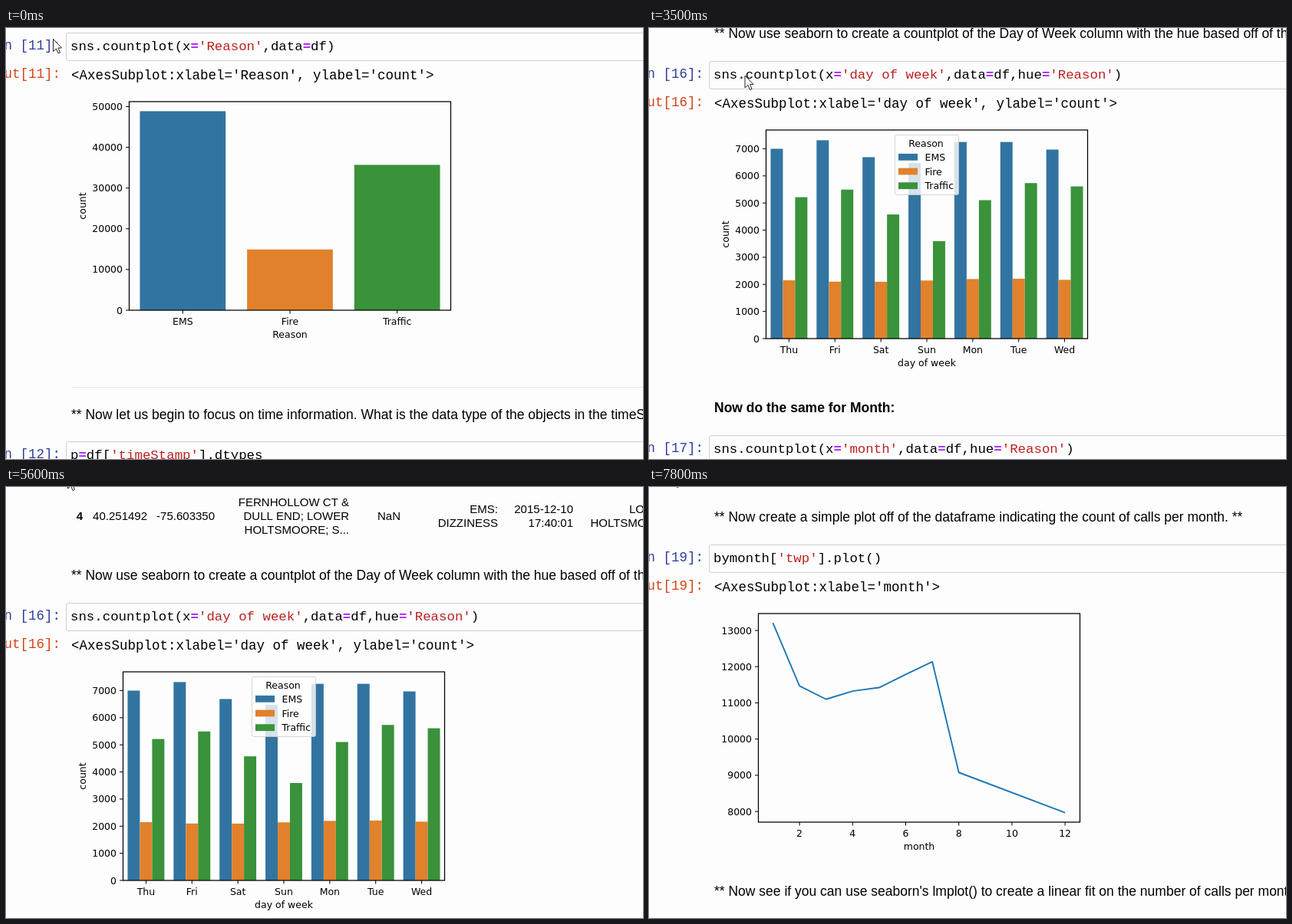
An HTML page with a canvas that plays this animation: 830x562 px, repeating every 8000 ms.

```html
<!DOCTYPE html>
<html lang="en">
<head>
<meta charset="utf-8">
<title>Notebook charts</title>
<style>
html, body { margin: 0; width: 100%; height: 100%; overflow: hidden; background: #fdfdfd; }
canvas { display: block; }
</style>
</head>
<body>
<canvas id="stage" width="830" height="562"></canvas>
<script>
const c = document.getElementById('stage').getContext('2d');
const SANS = '"Liberation Sans", Arial, sans-serif';
const MONO = '"Liberation Mono", "Courier New", monospace';
const LABEL = '12.5px "DejaVu Sans", sans-serif';
const HUES = ['#3274a1', '#e1812c', '#3a923a'];
const REASONS = ['EMS', 'Fire', 'Traffic'];
const DAYS = ['Thu', 'Fri', 'Sat', 'Sun', 'Mon', 'Tue', 'Wed'];
const MONTHS = [1, 2, 3, 4, 5, 6, 7, 8, 12];
const LOOP = 8000, CELL = 488; // CELL: distance from one code cell to the next
const AXES_W = 419, AXES_H = 272;

// calls per weekday: Fire is nearly flat, Traffic drops on Sunday
const dayEms = [7000, 7315, 6690, 6475, 7250, 7250, 6970];
const dayFire = DAYS.map((_, i) => 2150 - 60 * Math.sin(i));
const dayTraffic = dayEms.map((v, i) =>
  v * (.775 + .01 * (i - 3) - .22 * Math.exp(-((i - 3) ** 2))));

// calls per month, split into shares
const calls = [13205, 11467, 11101, 11326, 11423, 11786, 12137, 9078, 7969];
const emsShare = m => m < 3 ? .445 + .014 * m : .492 + .9 / m ** 3;
const monthEms = calls.map((v, i) => v * emsShare(MONTHS[i]));
const monthFire = calls.map(v => v * .152);
const monthTraffic = calls.map((v, i) => v - monthEms[i] - monthFire[i]);

function text(s, x, y, font, color = '#000', align = 'left') {
  c.font = font;
  c.fillStyle = color;
  c.textAlign = align;
  c.fillText(s, x, y);
}

function line(x1, y1, x2, y2, color = '#000') {
  c.strokeStyle = color;
  c.lineWidth = 1;
  c.beginPath();
  c.moveTo(x1, y1);
  c.lineTo(x2, y2);
  c.stroke();
}

function box(x, y, w, h, stroke, fill) {
  c.beginPath();
  c.roundRect(x, y, w, h, 2.5);
  c.fillStyle = fill;
  c.fill();
  c.strokeStyle = stroke;
  c.lineWidth = 1;
  c.stroke();
}

function heading(s, top, bold = '') {
  text(s, 85, top - 30, `${bold} 17.5px ${SANS}`);
}

function codeCell(n, code, top) {
  text(`In [${n}]:`, -13, top + 22, `17.5px ${MONO}`, '#303f9f');
  box(78.5, top + .5, 800, 36, '#cfcfcf', '#fdfdfd');
  let x = 84;
  for (const part of code.split(/('[^']*'|=)/)) {
    const op = part === '=';
    text(part, x, top + 23, `${op ? 'bold' : ''} 17.4px ${MONO}`,
      op ? '#aa22ff' : part[0] === "'" ? '#ba2121' : '#000');
    x += c.measureText(part).width;
  }
}

function output(n, s, top) {
  text(`Out[${n}]:`, -13, top + 59, `17.5px ${MONO}`, '#d84315');
  text(s, 85, top + 61, `17.5px ${MONO}`);
}

function yTick(left, y, label) {
  line(left - 4.5, y, left, y);
  text(label, left - 8.5, y + 4.5, LABEL, '#000', 'right');
}

function xTick(x, bottom, label) {
  line(x, bottom, x, bottom + 4.5);
  text(label, x, bottom + 19, LABEL, '#000', 'center');
}

function frame(left, bottom, xlabel) {
  c.strokeStyle = '#000';
  c.lineWidth = 1.25;
  c.strokeRect(left, bottom - AXES_H, AXES_W, AXES_H);
  text(xlabel, left + AXES_W / 2, bottom + 36, LABEL, '#000', 'center');
}

// series: one list of counts per hue; a single list colours each bar by category
function barChart({ left, top, names, series, step, scale, xlabel }) {
  const bottom = top + 362, slot = AXES_W / names.length;
  const w = slot * .8 / series.length;
  names.forEach((name, i) => {
    const mid = left + slot * (i + .5);
    series.forEach((counts, k) => {
      const h = counts[i] * scale;
      c.fillStyle = HUES[series.length > 1 ? k : i];
      c.fillRect(mid - slot * .4 + k * w, bottom - h, w, h);
    });
    xTick(mid, bottom, name);
  });
  for (let v = 0; v * scale < AXES_H; v += step) yTick(left, bottom - v * scale, v);
  frame(left, bottom, xlabel);
  c.save();
  c.translate(104, bottom - AXES_H / 2);
  c.rotate(-Math.PI / 2);
  text('count', 0, 0, LABEL, '#000', 'center');
  c.restore();
}

function legend(x, y) {
  box(x + .5, y + .5, 83, 78, 'rgba(204,204,204,.8)', 'rgba(255,255,255,.8)');
  text('Reason', x + 41, y + 16, LABEL, '#000', 'center');
  REASONS.forEach((name, i) => {
    const mid = y + 29.3 + i * 18.7;
    c.fillStyle = HUES[i];
    c.fillRect(x + 5, mid - 4.4, 25, 8.8);
    text(name, x + 39.5, mid + 4.7, LABEL);
  });
}

function reasonPage(top) {
  codeCell(11, "sns.countplot(x='Reason',data=df)", top);
  output(11, "<AxesSubplot:xlabel='Reason', ylabel='count'>", top);
  barChart({ left: 160.5, top, names: REASONS, series: [[48877, 14920, 35695]],
    step: 10000, scale: .00531, xlabel: 'Reason' });
  line(85, top + 462.5, 830, top + 462.5, '#e8e8e8');
  const next = top + 534;
  heading('** Now let us begin to focus on time information. What is the data type of the objects in the timeStamp column? **', next);
  codeCell(12, "p=df['timeStamp'].dtypes", next - 1);
}

function tableRow(top) {
  const font = `15px ${SANS}`;
  const cell = (right, ...lines) => lines.forEach((s, i) =>
    text(s, right, top - 108 + (i - (lines.length - 1) / 2) * 18, font, '#000', 'right'));
  text('4', 100, top - 108, 'bold ' + font, '#000', 'right');
  cell(184, '40.251492');
  cell(272, '-75.603350');
  cell(447, 'FERNHOLLOW CT &', 'DULL END; LOWER', 'HOLTSMOORE; S...');
  cell(514, 'NaN');
  cell(641, 'EMS:', 'DIZZINESS');
  cell(739, '2015-12-10', '17:40:01');
  cell(867, 'LOWER', 'HOLTSMOORE');
}

function weekPage(top) {
  tableRow(top);
  heading('** Now use seaborn to create a countplot of the Day of Week column with the hue based off of the Reason column. **', top);
  codeCell(16, "sns.countplot(x='day of week',data=df,hue='Reason')", top);
  output(16, "<AxesSubplot:xlabel='day of week', ylabel='count'>", top);
  barChart({ left: 152.5, top, names: DAYS, series: [dayEms, dayFire, dayTraffic],
    step: 1000, scale: .03536, xlabel: 'day of week' });
  legend(320, top + 96);
}

function monthPage(top) {
  heading('Now do the same for Month:', top, 'bold');
  codeCell(17, "sns.countplot(x='month',data=df,hue='Reason')", top);
  output(17, "<AxesSubplot:xlabel='month', ylabel='count'>", top);
  barChart({ left: 152.5, top, names: MONTHS, series: [monthEms, monthFire, monthTraffic],
    step: 1000, scale: .0427, xlabel: 'month' });
  legend(482, top + 95);
  heading('Did you notice something strange about the Plot?', top + CELL, 'bold');
}

function linePage(top) {
  heading('** Now create a simple plot off of the dataframe indicating the count of calls per month. **', top);
  codeCell(19, "bymonth['twp'].plot()", top);
  output(19, "<AxesSubplot:xlabel='month'>", top);
  const left = 142.5, bottom = top + 362;
  const px = m => left + 19 + (m - 1) * 34.6;
  const py = v => bottom - 12.4 - (v - 7969) * .04721;
  for (let m = 2; m <= 12; m += 2) xTick(px(m), bottom, m);
  for (let v = 8000; v <= 13000; v += 1000) yTick(left, py(v), v);
  frame(left, bottom, 'month');
  c.beginPath();
  calls.forEach((v, i) => c.lineTo(px(MONTHS[i]), py(v)));
  c.strokeStyle = '#1f77b4';
  c.lineWidth = 1.9;
  c.lineJoin = 'round';
  c.stroke();
  heading("** Now see if you can use seaborn's lmplot() to create a linear fit on the number of calls per month. **", top + CELL);
}

// pointer glides: start, end, from, to
const GLIDES = [
  [0, 300, [61.5, 14.5], [61, -30]],
  [1500, 2000, [25.5, -13], [72, -16]],
  [3500, 3700, [125, 62], [169.5, 139.5]],
  [4900, 5600, [170, -24], [80.5, -14]],
  [5800, 7100, [75, -18], [80, -20]],
  [7800, 8000, [30, -18], [30, -18]]];

function pointer(t) {
  const [start, end, from, to] = GLIDES.findLast(g => g[0] <= t);
  const u = Math.min(1, (t - start) / (end - start));
  const [x, y] = from.map((v, i) => v + (to[i] - v) * u * (2 - u));
  c.save();
  c.translate(x, y);
  const arrow = new Path2D('M0 0V16L4 12.5 6.5 18.5 9 17.5 6.5 11.5H11Z');
  c.fillStyle = '#fff';
  c.fill(arrow);
  c.strokeStyle = '#222';
  c.lineWidth = 1;
  c.stroke(arrow);
  c.restore();
}

function scrollAt(t) {
  const u = Math.min(1, Math.max(0, (t - 3600) / 600));
  return Math.round(108 * u ** 3.24);
}

function draw(now) {
  const t = Math.floor(now % LOOP / 100) * 100;
  c.fillStyle = '#fdfdfd';
  c.fillRect(0, 0, 830, 562);
  if (t < 1500) reasonPage(6);
  else if (t < 7800) {
    const top = t < 5800 ? 43 + scrollAt(t) : 99 - CELL;
    weekPage(top);
    monthPage(top + CELL);
  } else linePage(75);
  pointer(t);
}

let start;
function tick(now) {
  start ??= now;
  draw(now - start);
  requestAnimationFrame(tick);
}
draw(0);
requestAnimationFrame(tick);
</script>
</body>
</html>
```
